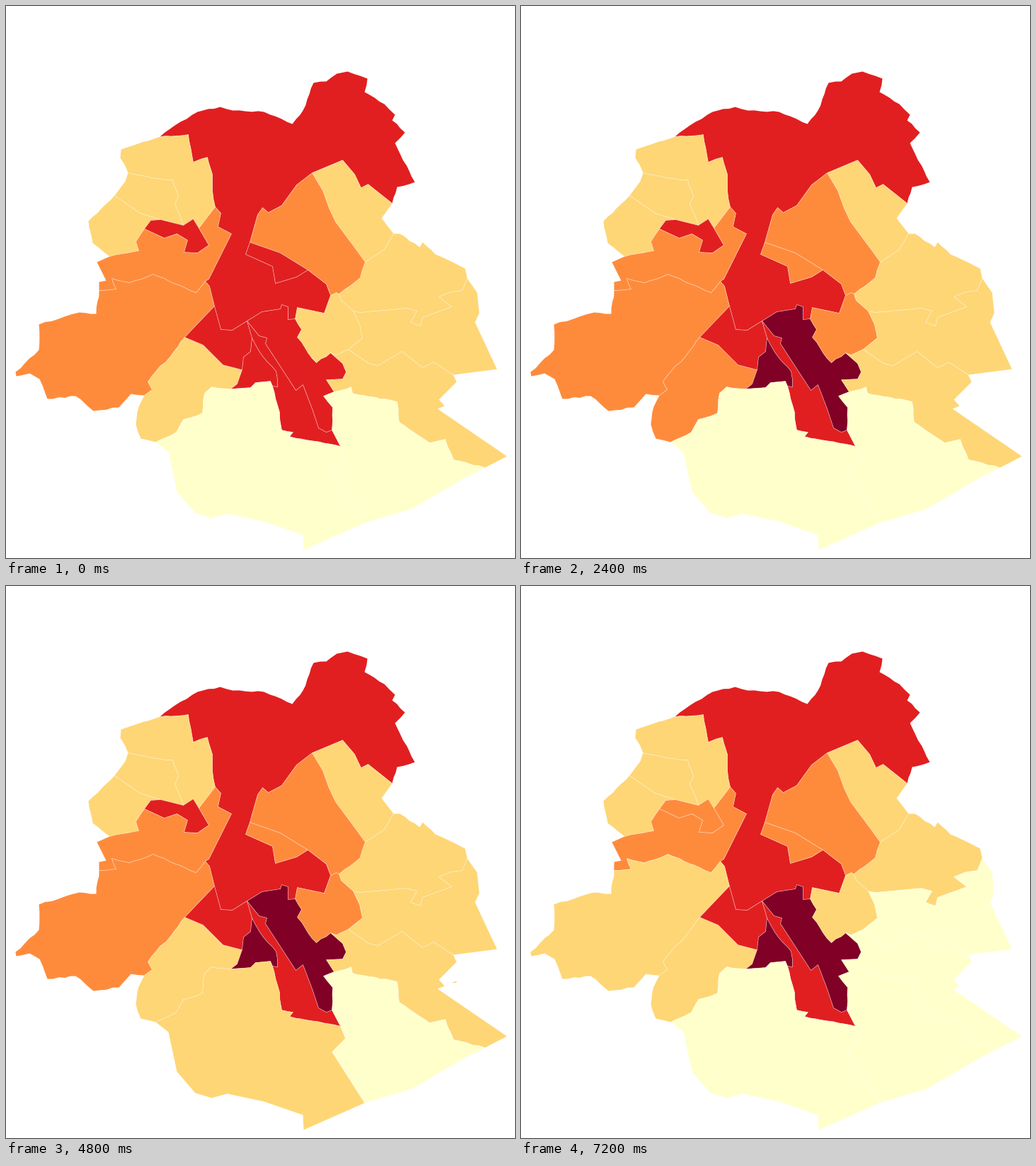
Write a matplotlib script that moves like this. It is 719 px wide and 779 px high and loops after 8400 ms.

```python
import math
import random

import matplotlib.pyplot as plt
from matplotlib.animation import FuncAnimation
from matplotlib.collections import LineCollection
from matplotlib.patches import Polygon

W, H, DPI = 719, 779, 64
STEP_MS = 1200
SHADES = ["#ffffcc", "#fed676", "#fe8b3c", "#e11f20", "#800026"]
NOTCH, JITTER = 8, 0.9  # spacing and depth of ragged edges, in pixels

# Junctions where borders meet.
NODES = dict(
    a=(217, 184), b=(545, 278), c=(432, 235), d=(344, 333), e=(426, 372),
    f=(458, 408), g=(408, 441), h=(340, 444), i=(294, 423), j=(281, 388),
    k=(295, 283), l=(507, 361), m=(547, 321), n=(470, 406), o=(172, 235),
    p=(272, 313), q=(250, 309), r=(218, 301), s=(153, 267), t=(195, 314),
    u=(146, 353), v=(131, 401), w=(195, 549), x=(252, 467), y=(333, 513),
    z=(317, 540), A=(211, 615), B=(347, 468), C=(376, 536), D=(460, 598),
    E=(472, 621), F=(458, 489), G=(483, 484), H=(490, 430), I=(463, 544),
    J=(651, 384), K=(631, 520), L=(676, 651), M=(506, 729), N=(387, 348),
)
rng = random.Random(4)
borders = {}


def roughen(points):
    """Break straight runs into short, slightly uneven pieces."""
    out = []
    for (x0, y0), (x1, y1) in zip(points, points[1:]):
        out.append((x0, y0))
        count = int(math.hypot(x1 - x0, y1 - y0) / NOTCH)
        for n in range(1, count):
            s = n / count
            out.append((x0 + s * (x1 - x0) + rng.uniform(-JITTER, JITTER),
                        y0 + s * (y1 - y0) + rng.uniform(-JITTER, JITTER)))
    return out + [points[-1]]


def straight(ends, *bends):
    borders[ends] = [NODES[ends[0]], *bends, NODES[ends[1]]]


def ragged(ends, *bends):
    straight(ends, *bends)
    borders[ends] = roughen(borders[ends])


# Outer rim, clockwise
ragged("ab", (246, 163), (270, 149), (302, 142), (320, 147), (364, 149),
       (404, 166), (419, 147), (434, 108), (452, 106), (467, 95), (482, 92),
       (510, 102), (506, 121), (534, 138), (549, 153), (545, 161), (563, 178),
       (549, 193), (577, 248), (552, 255))
straight("bm", (530, 299))
ragged("mJ", (556, 321), (584, 340), (588, 333), (606, 350), (648, 370))
straight("JK", (665, 404), (668, 433), (662, 446), (693, 512))
straight("KL", (636, 530), (611, 555), (619, 564), (609, 568), (707, 635))
straight("LM", (650, 664), (573, 709))
straight("MA", (420, 767), (419, 746), (364, 727), (312, 716), (290, 722),
         (267, 715), (241, 685), (229, 629))
ragged("wA", (187, 565), (183, 590), (190, 610))
ragged("vw", (127, 434), (103, 432), (74, 441), (46, 449), (46, 485),
       (13, 516), (14, 522), (33, 518), (47, 526), (58, 554), (98, 550),
       (123, 571), (159, 566), (176, 547))
straight("uv", (128, 361), (141, 387), (131, 389))
ragged("su", (116, 303), (122, 334))
straight("os", (168, 247))
ragged("ao", (162, 202), (161, 214))

# North
straight("bc", (511, 251), (501, 256), (492, 237), (475, 217))
straight("cl", (447, 260), (456, 285), (465, 304), (494, 343))
straight("ml", (534, 343))
ragged("ln", (500, 383))
straight("nf", (466, 404))
straight("cd", (410, 252), (389, 281), (370, 291), (362, 284), (355, 294))
straight("dN")
straight("Ne")
straight("de", (338, 350), (376, 367), (380, 391), (410, 382))
straight("ef", (452, 392))

# West
ragged("ak", (257, 181), (264, 220), (284, 213), (291, 237), (291, 260))
straight("kp")
straight("pq", (264, 300))
ragged("oq", (214, 243), (235, 245), (243, 268), (238, 279))
straight("sr", (189, 292))
straight("rq")
ragged("ut", (187, 345), (183, 332))
straight("tr", (204, 302))
straight("tp", (223, 327), (241, 321), (256, 330), (251, 347), (270, 348),
         (286, 337))
straight("kj", (303, 292), (299, 311), (318, 321), (286, 385))
ragged("jv", (268, 404), (207, 378), (174, 390), (149, 384), (155, 399))
straight("ji", (287, 395))
ragged("wx", (206, 541), (200, 530), (217, 508), (232, 494))
straight("xi", (271, 447))

# Centre
straight("ih", (303, 456), (319, 457))
straight("xy", (278, 478), (306, 506))
straight("yz", (326, 533))
ragged("Az", (240, 601), (250, 583), (277, 574), (280, 546), (290, 537))
straight("yB", (335, 495), (345, 487))
straight("Bh")
ragged("BC", (358, 488), (381, 515), (383, 537))
straight("zC", (345, 538), (352, 531), (373, 529))
ragged("CE", (386, 573), (389, 598), (405, 601), (400, 607))
straight("hD", (357, 465), (368, 468), (366, 476), (409, 542), (419, 534),
         (432, 568), (441, 595), (452, 601))
straight("DE")
straight("hg", (361, 431), (387, 427), (389, 421), (398, 424), (398, 442))

# East and south
straight("gf", (411, 425), (449, 433))
ragged("gF", (417, 456), (411, 467), (438, 503))
straight("FG", (466, 492))
straight("GH", (503, 468), (499, 449))
straight("nH", (473, 415))
straight("FI", (475, 504), (480, 516), (475, 526), (452, 527))
ragged("ID", (448, 550), (461, 566), (461, 585))
straight("HJ", (500, 432), (565, 426), (580, 430), (571, 446), (585, 451),
         (588, 439), (629, 424), (611, 410), (628, 403), (644, 401))
straight("GK", (512, 504), (525, 507), (559, 487), (588, 510), (604, 502))
ragged("IL", (487, 537), (489, 546), (552, 558), (555, 587), (598, 616),
       (620, 611), (632, 640))
straight("ME", (460, 657), (479, 638))

# Ring of junctions for each district, with its shade in every step.
DISTRICTS = {
    "abcdefghijk": "3333323",
    "hDECB": "3333323",
    "bmlc": "1111111",
    "clnfeNd": "2222222",
    "dNe": "3222222",
    "akpqo": "1111111",
    "oqrs": "1111101",
    "srtu": "1011111",
    "rqpt": "3232322",
    "kjvutp": "2223222",
    "vjixw": "2222211",
    "xyzAw": "1121111",
    "xihBy": "3332323",
    "yBCz": "3444434",
    "hgFID": "3444434",
    "fnHGFg": "1221211",
    "mJHnl": "1111101",
    "JKGH": "1110110",
    "KLIFG": "1111100",
    "ILMED": "0000000",
    "AzCEM": "0101100",
}
ISLET_STEPS = {1, 3, 4}


def edges(ring):
    return zip(ring, ring[1:] + ring[0])


def outline(ring):
    points = []
    for start, end in edges(ring):
        line = borders.get(start + end) or borders[end + start][::-1]
        points += line[:-1]
    return points


def is_shared(ends):
    users = [ring for ring in DISTRICTS
             if any(set(ends) == set(edge) for edge in edges(ring))]
    return len(users) > 1


fig = plt.figure(figsize=(W / DPI, H / DPI), dpi=DPI, facecolor="white")
ax = fig.add_axes([0, 0, 1, 1])
ax.set_xlim(-0.5, W - 0.5)
ax.set_ylim(H - 0.5, -0.5)
ax.axis("off")

areas = {ring: ax.add_patch(Polygon(outline(ring), linewidth=0))
         for ring in DISTRICTS}
inner = [line for ends, line in borders.items() if is_shared(ends)]
ax.add_collection(LineCollection(inner, colors="white", linewidths=0.8,
                                 alpha=0.55, zorder=2))
islet = ax.add_patch(Polygon([(630, 559), (636, 557), (636, 559), (631, 560)],
                             facecolor=SHADES[1], linewidth=0))


def draw(step):
    for ring, area in areas.items():
        area.set_facecolor(SHADES[int(DISTRICTS[ring][step])])
    islet.set_visible(step in ISLET_STEPS)
    return [*areas.values(), islet]


anim = FuncAnimation(fig, draw, frames=7, interval=STEP_MS, repeat=True,
                     repeat_delay=0, blit=False)
plt.show()
```
